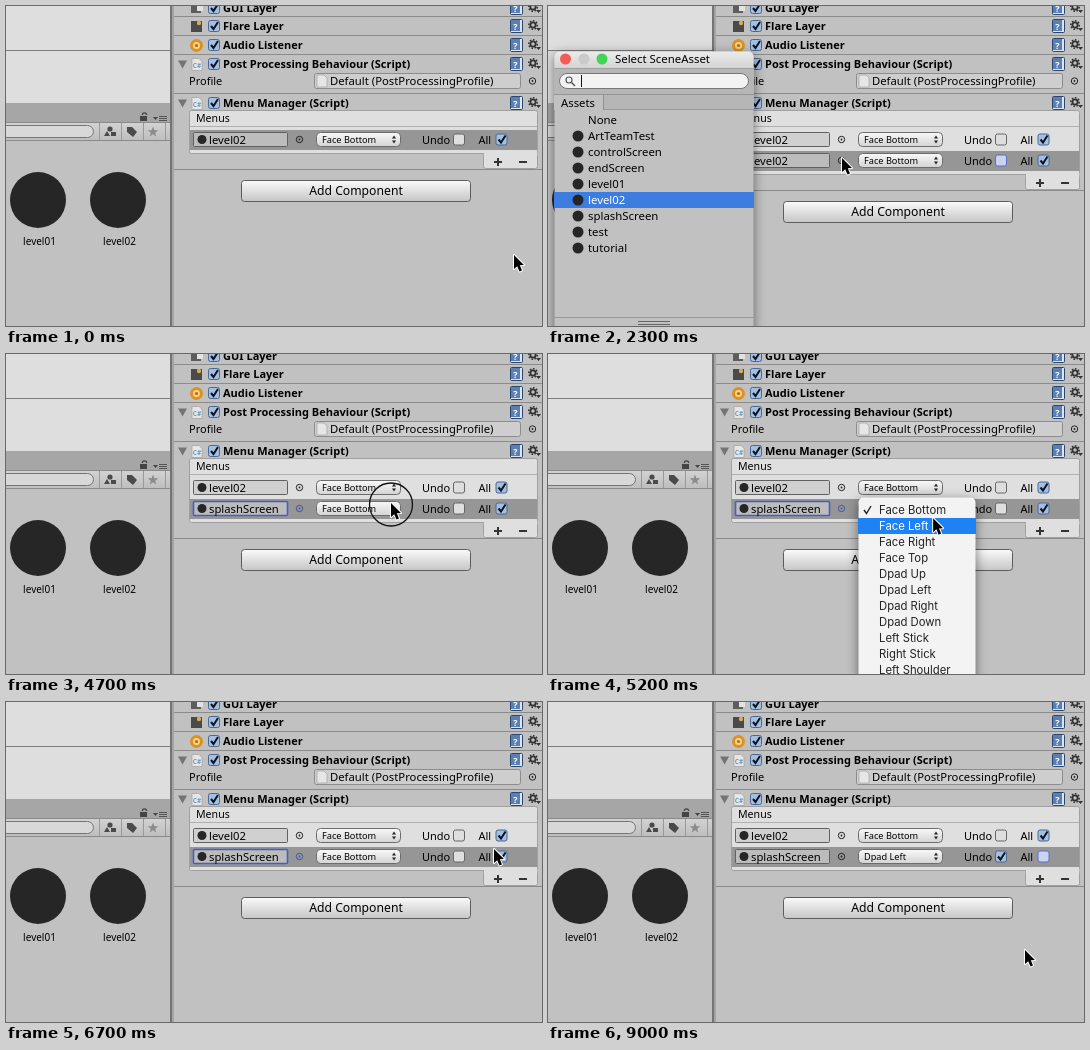
Write an HTML page with a canvas that moves like this. It is 536 px wide and 320 px high and loops after 9.1 s.

```html
<!DOCTYPE html>
<html lang="en">
<head>
<meta charset="utf-8">
<title>Menu Manager inspector</title>
<style>
html, body { margin: 0; width: 536px; height: 320px; overflow: hidden; }
canvas { display: block; }
</style>
</head>
<body>
<canvas id="stage" width="536" height="320"></canvas>
<script>
const c = document.getElementById('stage').getContext('2d');
const LOOP = 9100;
const UI = '"Noto Sans", "Open Sans", sans-serif';
const SYSTEM = 'Inter, Roboto, sans-serif';
const INK = '#000', BG = '#c1c1c1', MARK = '#262626';

// Cursor path: time, x, y of the tip
const PATH = [
  [0, 508, 249], [800, 489, 155], [1700, 489, 155], [2100, 294, 152], [2400, 294, 152],
  [3100, 110, 184], [3200, 110, 184], [3500, 73, 208], [4200, 73, 208], [4500, 385, 149],
  [5000, 385, 149], [5800, 386, 246], [6000, 386, 246], [6200, 386, 237], [6300, 386, 237],
  [6700, 488, 147], [7300, 450, 153], [7800, 450, 153], [8200, 493, 154], [8400, 493, 154],
  [9000, 477, 248]
];
const CLICKS = [[800, 1000], [2100, 2200], [3500, 3700], [3800, 3900], [4700, 4900],
  [6200, 6400], [7500, 7700], [8200, 8500]];
const SCENES = ['None', 'ArtTeamTest', 'controlScreen', 'endScreen', 'level01', 'level02',
  'splashScreen', 'test', 'tutorial'];
const BUTTONS = ['Face Bottom', 'Face Left', 'Face Right', 'Face Top', 'Dpad Up', 'Dpad Left',
  'Dpad Right', 'Dpad Down', 'Left Stick', 'Right Stick', 'Left Shoulder'];

function cursorAt(t) {
  const i = PATH.findIndex(p => p[0] >= t);
  if (i <= 0) return PATH[i ? PATH.length - 1 : 0].slice(1);
  const [t0, x0, y0] = PATH[i - 1], [t1, x1, y1] = PATH[i];
  const u = (t - t0) / (t1 - t0), k = u * u * (3 - 2 * u);
  return [x0 + (x1 - x0) * k, y0 + (y1 - y0) * k];
}

function rect(x, y, w, h, fill) {
  c.fillStyle = fill;
  c.fillRect(x, y, w, h);
}

function box(x, y, w, h, fill, stroke, r = 0, width = 1) {
  c.beginPath();
  c.roundRect(x + .5, y + .5, w - 1, h - 1, r);
  paint(fill, stroke, width);
}

function paint(fill, stroke, width = 1) {
  if (fill) { c.fillStyle = fill; c.fill(); }
  if (stroke) { c.strokeStyle = stroke; c.lineWidth = width; c.stroke(); }
}

function circle(x, y, r, fill, stroke, width) {
  c.beginPath();
  c.arc(x, y, r, 0, 7);
  paint(fill, stroke, width);
}

function poly(points, fill, stroke, width) {
  c.beginPath();
  for (let i = 0; i < points.length; i += 2) c.lineTo(points[i], points[i + 1]);
  if (fill) c.closePath();
  paint(fill, stroke, width);
}

function text(s, x, y, size = 11.3, { color = INK, weight = 400, family = UI, align = 'left' } = {}) {
  c.font = `${weight} ${size}px ${family}`;
  c.textAlign = align;
  c.fillStyle = color;
  c.fillText(s, x, y);
}

function shade(y, h, top, bottom) {
  const g = c.createLinearGradient(0, y, 0, y + h);
  g.addColorStop(0, top);
  g.addColorStop(1, bottom);
  return g;
}

function shadow(on) {
  c.shadowColor = on ? 'rgba(0,0,0,.5)' : 'transparent';
  c.shadowBlur = on ? 12 : 0;
  c.shadowOffsetY = on ? 3 : 0;
}

function tick(x, y) {
  poly([x - 3, y, x - .5, y + 3, x + 4, y - 4], null, '#10131c', 2);
}

function checkbox(x, y, on, focus) {
  box(x - 6, y - 6, 12, 12, focus ? '#cbd3ef' : on ? '#a3bfe3' : '#dedede',
    focus ? '#5870c8' : on ? '#4a6892' : '#666', 2);
  if (on) tick(x, y);
}

function picker(x, y, color = '#222') {
  circle(x, y, 3.2, null, color);
  circle(x, y, .9, color);
}

function page(x, y, label) {
  const outline = [x - 5, y - 6, x + 2, y - 6, x + 5, y - 3, x + 5, y + 6, x - 5, y + 6, x - 5, y - 6];
  poly(outline, '#e6e6e6', '#a2a2a2', .7);
  if (label) text(label, x, y + 3, 6.5, { color: '#6a9cc0', weight: 700, align: 'center' });
}

function gear(x, y) {
  circle(x, y, 2.6, null, '#333', 1.8);
  c.setLineDash([1.6, 1.6]);
  circle(x, y, 4.2, null, '#333', 1.6);
  c.setLineDash([]);
  poly([x + 3, y + 3, x + 8, y + 3, x + 5.5, y + 6], '#333');
}

function component(label, y) {
  checkbox(208, y, true);
  text(label, 217, y + 4, 11, { weight: 700 });
  box(504, y - 7, 13, 14, '#dfe5ee', '#2c456b', 1);
  rect(505, y - 6, 9, 11, '#5b7fb2');
  text('?', 509.5, y + 3.5, 9, { color: '#fff', weight: 700, align: 'center' });
  gear(527, y - 1);
}

function foldout(y) {
  poly([172, y - 4, 181, y - 4, 176.5, y + 4], '#747474');
}

function rule(y) {
  rect(168, y, 368, 1, '#8b8b8b');
}

function projectPanel() {
  rect(0, 0, 164, 97, '#dedede');
  rect(0, 44, 164, 1, '#7c7c7c');
  rect(0, 97, 164, 20, '#a6a6a6');
  rect(0, 117, 164, 18, shade(117, 18, '#d2d2d2', '#bdbdbd'));
  rect(0, 116, 164, 1, '#8a8a8a');
  rect(0, 134, 164, 1, '#8a8a8a');
  box(-12, 119, 100, 13, '#d8d8d8', '#757575', 6);
  rect(134, 110, 7, 5, '#444');
  c.beginPath();
  c.arc(138.5, 109, 2.2, Math.PI, 0);
  paint(null, '#444', 1.2);
  poly([147, 111, 152, 111, 149.5, 114], '#444');
  for (let y = 110; y < 116; y += 2) rect(153, y, 8, 1, '#555');
  for (const x of [93, 115, 137, 159]) rect(x, 117, 1, 17, '#999');
  circle(104, 123, 2.6, '#4a4a4a');
  poly([98, 130, 101, 125, 104, 130], '#4a4a4a');
  rect(105, 126, 5, 4, '#4a4a4a');
  poly([121, 121, 126, 121, 131, 126, 127, 131, 121, 126], '#4a4a4a');
  const star = [];
  for (let i = 0; i < 10; i++) {
    const r = i % 2 ? 2.3 : 5.5, a = i * Math.PI / 5;
    star.push(147 + r * Math.sin(a), 126 - r * Math.cos(a));
  }
  poly(star, '#8b8b8b');
  ['level01', 'level02'].forEach((name, i) => {
    circle(32 + i * 80, 194, 28, MARK);
    text(name, 33.5 + i * 80, 239, 10, { align: 'center' });
  });
  rect(164, 0, 4, 320, '#a4a4a4');
  rect(164, 0, 2, 320, '#747474');
}

function listRow(y, row) {
  const { scene, button, undo, all, selected, focus } = row;
  if (selected) rect(184, y - 9, 347, 20, '#969696');
  const glow = focus === 'field';
  box(187, y - 7, 95, 15, selected ? '#bcbcbc' : '#d0d0d0', glow ? '#4a5cc4' : '#606060', 1, glow ? 1.6 : 1);
  circle(196, y + .5, 4.5, MARK);
  text(scene, 203, y + 4.5);
  picker(293.5, y + .5, glow ? '#3b55b5' : '#222');
  box(310, y - 7, 85, 15, shade(y - 7, 15, '#fafafa', '#d2d2d2'), '#6c6c6c', 4);
  text(button, 316, y + 4, 9.2);
  poly([386, y - .5, 390, y - .5, 388, y - 3.5], '#222');
  poly([386, y + 1.5, 390, y + 1.5, 388, y + 4.5], '#222');
  text('Undo', 416, y + 4.5, 11);
  checkbox(453, y + .5, undo, focus === 'undo');
  text('All', 472.5, y + 4.5, 11);
  checkbox(495.5, y + .5, all, focus === 'all');
}

function inspector(t) {
  const added = t >= 1000, grow = added ? 21 : 0;
  [10, 29, 48, 87, 163 + grow].forEach(rule);
  rect(185, 0, 10, 7, '#5d5d5d');
  rect(191, 0, 6, 5, '#e3e3e3');
  rect(185, 15, 11, 11, '#4a4a48');
  circle(193, 17, 2.2, '#d9a95c');
  circle(190.5, 39.5, 5, '#f5d489', '#dc9220', 3);
  circle(190.5, 39.5, 1.6, '#b36e12');
  component('GUI Layer', 2);
  component('Flare Layer', 20);
  component('Audio Listener', 39);
  component('Post Processing Behaviour (Script)', 58);
  component('Menu Manager (Script)', 97);
  for (const y of [58, 97]) {
    foldout(y + .5);
    page(191, y + .5, 'C#');
  }
  text('Profile', 183, 79, 11);
  box(308, 67, 207, 16, '#cecece', '#8c8c8c', 2);
  page(316, 75);
  text('Default (PostProcessingProfile)', 324, 79);
  picker(526.5, 75);

  box(183, 104, 349, 44 + grow, '#dfdfdf', '#a0a0a0', 2);
  rect(184, 120, 347, 1, '#b0b0b0');
  text('Menus', 190, 116, 10.6);
  box(477, 147 + grow, 55, 16, '#dfdfdf', '#a0a0a0', 2);
  rect(478, 146 + grow, 53, 3, '#dfdfdf');
  rect(488, 155 + grow, 8, 2, '#333');
  rect(491, 152 + grow, 2, 8, '#333');
  rect(513, 155 + grow, 8, 2, '#333');

  listRow(133, { scene: 'level02', button: 'Face Bottom', all: true, selected: !added });
  if (added) listRow(154, {
    scene: t < 3700 ? 'level02' : 'splashScreen',
    button: t < 6800 ? 'Face Bottom' : 'Dpad Left',
    undo: t >= 7600,
    all: t < 8400,
    selected: true,
    focus: t < 1100 ? '' : t < 3900 ? 'undo' : t < 7600 ? 'field' : t < 8400 ? 'undo' : 'all'
  });
  box(235, 174 + grow, 230, 22, shade(174 + grow, 22, '#fcfcfc', '#c4c4c4'), '#5c5c5c', 3);
  text('Add Component', 350, 189 + grow, 12.2, { align: 'center' });
}

function scenePicker(chosen) {
  shadow(true);
  box(6, 45, 200, 290, BG, null, 5);
  shadow(false);
  box(6, 45, 200, 22, shade(45, 18, '#ececec', '#d2d2d2'), null, 5);
  rect(6, 62, 200, 42, '#b6b6b6');
  rect(6, 62, 200, 1, '#a0a0a0');
  circle(17.5, 53, 5.5, '#f45b54');
  circle(36, 53, 5.5, '#cacaca');
  circle(54, 53, 5.5, '#42d357');
  text('Select SceneAsset', 67, 57, 11.4);
  box(11, 67, 190, 16, '#f3f3f3', '#777', 8);
  circle(21, 74, 3, null, '#555', 1.2);
  poly([23.5, 76.5, 27, 80], null, '#555', 1.5);
  rect(33, 69, 1, 12, '#111');
  rect(6, 88, 200, 1, '#959595');
  rect(6, 103, 200, 1, '#999');
  rect(6, 89, 49, 15, BG);
  rect(55, 89, 1, 15, '#909090');
  text('Assets', 13, 101);
  SCENES.forEach((name, i) => {
    const y = 114 + i * 16, on = i === chosen;
    if (on) rect(6, y - 8, 200, 16, '#3e7de0');
    if (i) circle(30, y, 5.5, MARK);
    text(name, 40, y + 4, 11.4, { color: on ? '#fff' : INK });
  });
  rect(6, 311, 200, 1, '#999');
  rect(90, 315, 32, 1, '#666');
  rect(90, 318, 32, 1, '#666');
}

function buttonMenu(y, alpha) {
  c.globalAlpha = alpha;
  shadow(true);
  box(310, 143, 118, 190, '#f3f3f3', null, 5);
  shadow(false);
  const hover = Math.max(0, Math.floor((y - 148) / 16));
  BUTTONS.forEach((name, i) => {
    const mid = 156 + i * 16, color = i === hover ? '#fff' : '#222';
    if (i === hover) rect(310, mid - 8, 118, 16, '#1f82f4');
    if (!i) poly([316, mid, 318.5, mid + 3.5, 323, mid - 4], null, color, 1.4);
    text(name, 331, mid + 4, 11.3, { color, family: SYSTEM });
  });
  c.globalAlpha = 1;
}

function cursor(x, y) {
  c.save();
  c.translate(x, y);
  c.lineJoin = 'round';
  const arrow = [0, 0, 0, 14, 3.2, 11.2, 5.5, 16.5, 8, 15.4, 5.8, 10.3, 10, 10];
  poly(arrow, '#000', '#fff', 2);
  poly(arrow, '#000');
  c.restore();
}

function draw(now) {
  const t = Math.floor(now % LOOP / 100) * 100;
  const [x, y] = cursorAt(t);
  rect(0, 0, 536, 320, BG);
  projectPanel();
  inspector(t);
  if (t >= 2200 && t < 4000) scenePicker(t < 3600 ? 5 : 6);
  if (t >= 4900 && t < 6600) buttonMenu(t < 6300 ? y : 237, t < 6400 ? 1 : (6600 - t) / 300);
  if (CLICKS.some(([a, b]) => t >= a && t < b)) circle(x, y + 1.5, 21.5, null, '#111', 1.3);
  cursor(x, y);
  requestAnimationFrame(draw);
}
draw(0);
</script>
</body>
</html>
```
